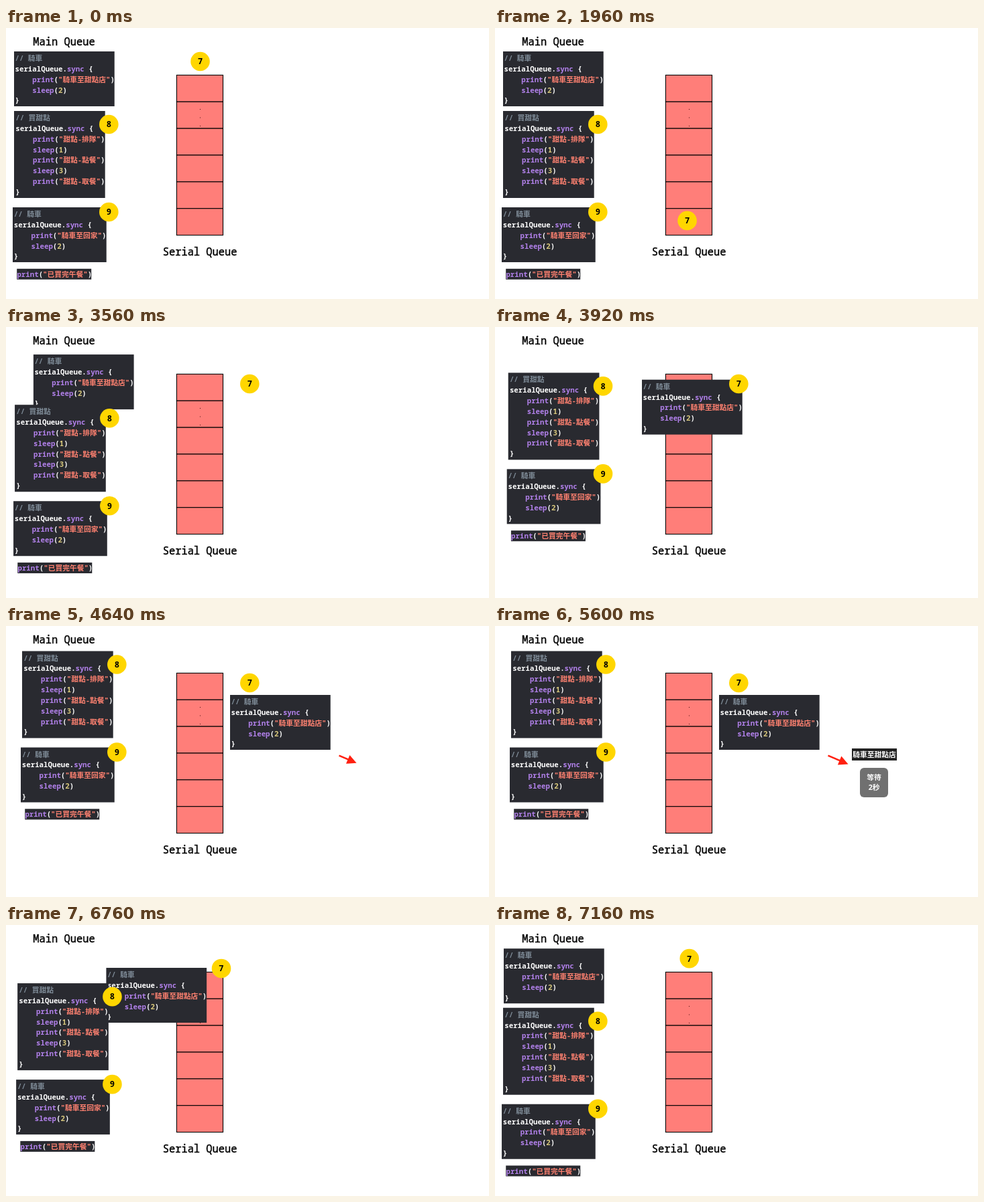
Animation, 720 px wide and 405 px high, one loop 7.2 s. Source, as an HTML page:

```html
<!DOCTYPE html>
<html lang="zh-Hant">
<head>
<meta charset="utf-8">
<style>
  html, body { margin: 0; width: 100%; height: 100%; overflow: hidden; background: #fff; }
  svg { display: block; width: 720px; height: 405px; }
  text { font-family: "Noto Sans Mono", "Noto Sans CJK TC", "Noto Sans CJK", monospace; }
  .title { font-size: 15.4px; stroke: #000; stroke-width: .4px; }
  .code { font-size: 10.75px; font-weight: 600; white-space: pre; }
  .digit { font: 800 11.8px "Noto Sans", sans-serif; text-anchor: middle; }
  .note { font-size: 10.75px; font-weight: 700; fill: #fff; text-anchor: middle; }
</style>
</head>
<body>
<svg viewBox="0 0 720 405">
  <text class="title" x="40.3" y="25.5">Main Queue</text>
  <text class="title" x="233.7" y="339.5">Serial Queue</text>
  <g id="queue" fill="#ff7e79" stroke="#000" stroke-width="1.1"></g>
  <path d="M289.5 121v1m0 11.5v1m0 11.5v1" stroke="#300" stroke-width=".9"/>
  <g id="first"></g>
  <g id="rest"></g>
  <g id="output">
    <g id="arrow" fill="#ff2010" stroke="#ff2010">
      <path id="shaft" stroke-width="2.5"/>
      <path id="head" d="M0 0L-14 -7V7z" stroke="none"/>
    </g>
    <g id="label">
      <rect x="-33.5" y="-9" width="67" height="18" fill="#222"/>
      <text class="note" y="4">騎車至甜點店</text>
    </g>
    <g id="wait">
      <rect x="544" y="212" width="42" height="44" rx="6"/>
      <text class="note" x="565" y="230">等待</text>
      <text class="note" x="565" y="245">2秒</text>
    </g>
  </g>
  <g id="seven"></g>
</svg>
<script>
const $ = id => document.getElementById(id);
const LOOP = 7200, MOVE = 960;

const colorOf = token =>
  token.startsWith('//') ? '#7f8c98' :
  token[0] === '"' ? '#ff8170' :
  /^(print|sleep|sync)$/.test(token) ? '#b281eb' :
  /^\d$/.test(token) ? '#d9c97c' : '#fff';

function card(x, y, w, h, source, inset = 1.5, baseline = 14) {
  const lines = source.split('\n').map((line, i) => {
    const code = line.trimStart();
    const left = x + inset + (line.length - code.length) * 6.45;
    const spans = code.match(/\/\/.*|"[^"]*"|print|sleep|sync|\d|[a-zA-Z]+|[^\w"]+/g)
      .map(token => `<tspan fill="${colorOf(token)}">${token}</tspan>`).join('');
    return `<text class="code" x="${left}" y="${y + baseline + i * 15.85}">${spans}</text>`;
  }).join('');
  return `<rect x="${x}" y="${y}" width="${w}" height="${h}" fill="#292a30"/>${lines}`;
}

const badge = (n, x, y) =>
  `<circle cx="${x}" cy="${y}" r="14.3" fill="#ffd600"/><text class="digit" x="${x}" y="${y + 4.4}">${n}</text>`;

const task = body => `serialQueue.sync {\n${body.map(line => '    ' + line).join('\n')}\n}`;

for (let i = 0; i < 6; i++)
  $('queue').innerHTML += `<rect x="254.4" y="${70.4 + i * 39.87}" width="69.1" height="39.87"/>`;
$('first').innerHTML = card(12, 35, 149.7, 82,
  '// 騎車\n' + task(['print("騎車至甜點店")', 'sleep(2)']));
$('rest').innerHTML =
  card(12, 124, 135.7, 130, '// 買甜點\n' + task([
    'print("甜點-排隊")', 'sleep(1)', 'print("甜點-點餐")', 'sleep(3)', 'print("甜點-取餐")']), 2.2) +
  card(10, 268, 139.7, 82, '// 騎車\n' + task(['print("騎車至回家")', 'sleep(2)']), 1.8) +
  card(16.2, 359.8, 111, 16, 'print("已買完午餐")', .2, 12) +
  badge(8, 153.3, 144) + badge(9, 153.3, 275);
$('seven').innerHTML = badge(7, 0, 0);

const ramp = (t, start, length) => Math.min(1, Math.max(0, (t - start) / length));
const mix = (a, b, p) => a + (b - a) * p;
const cubic = (a, b, c, d, u) =>
  a * (1 - u) ** 3 + 3 * b * u * (1 - u) ** 2 + 3 * c * u * u * (1 - u) + d * u ** 3;

// Same curve as CSS ease-in-out, solved by bisection.
function ease(x) {
  let low = 0, high = 1;
  for (let i = 0; i < 20; i++) {
    const mid = (low + high) / 2;
    if (cubic(0, .42, .58, 1, mid) < x) low = mid; else high = mid;
  }
  return cubic(0, 0, 1, 1, (low + high) / 2);
}

const backOut = x => 1 + 3.1 * (x - 1) ** 3 + 2.1 * (x - 1) ** 2;
const place = (id, x, y, extra = '') => $(id).setAttribute('transform', `translate(${x} ${y})${extra}`);
const fade = (id, value) => $(id).setAttribute('opacity', value);

function render(t) {
  const move = start => ease(ramp(t, start, MOVE));
  const enter = move(480), leave = move(1920), back = move(6240);
  const run = move(3360) - back;

  place('first', 322 * run, 68 * run);
  place('rest', 12 * run, -86.5 * run);

  if (t < 1920) place('seven', 289.5, mix(50, 288.5, enter));
  else if (t < 6240) place('seven', cubic(289.5, 5, 367, 363.3, leave), cubic(288.5, 230, 154, 85, leave));
  else place('seven', mix(363.3, 289.5, back), mix(85, 50, back));

  const drawn = Math.sin(ramp(t, 4320, 480) * Math.PI / 2);
  const tipX = 496.5 + 30 * drawn, tipY = 193.7 + 12.8 * drawn;
  fade('arrow', drawn > 0 ? 1 : 0);
  $('shaft').setAttribute('d', `M496.5 193.7L${tipX - 10 * drawn} ${tipY - 4.3 * drawn}`);
  place('head', tipX, tipY, ` rotate(23) scale(${Math.min(1, drawn * 2)})`);

  const pop = ramp(t, 4880, 400);
  place('label', 565.5, 192, ` scale(${pop > 0 ? backOut(pop) : 0})`);
  fade('wait', ramp(t, 5400, 360));
  fade('output', 1 - ramp(t, 6240, 320));
}

const origin = performance.now();
function tick() {
  render((performance.now() - origin) % LOOP);
  requestAnimationFrame(tick);
}
render(0);
requestAnimationFrame(tick);
</script>
</body>
</html>
```
